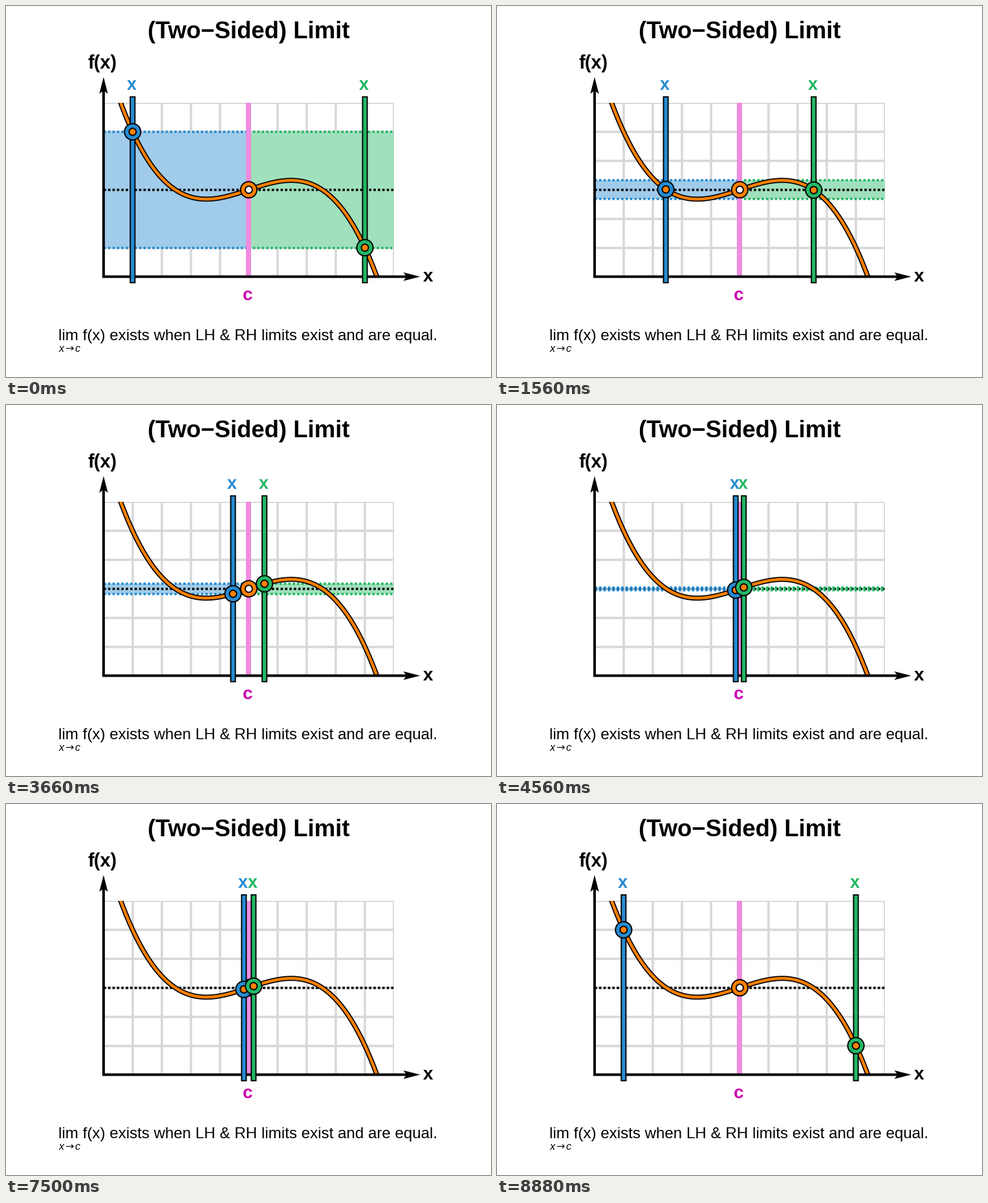
These frames come from a looping animation (750 by 575 pixels, 8940 ms). A matplotlib script:

```python
import numpy as np
import matplotlib.pyplot as plt
from matplotlib.animation import FuncAnimation
from matplotlib.patches import Circle, Polygon, Rectangle

WIDTH, HEIGHT, DPI = 750, 575, 100
FRAMES, INTERVAL = 149, 60
HOLD_END, MEET, LEAVE = 8, 93, 124

CX, CY, UNIT = 375.4, 284.8, 44.9
LEFT, RIGHT = CX - 5 * UNIT, CX + 5 * UNIT
TOP, BOTTOM = CY - 3 * UNIT, CY + 3 * UNIT
FAR = 4

BLUE, GREEN, ORANGE, TEAL = "#268bd2", "#22b765", "#ff8000", "#24a19c"
LIGHT_BLUE, LIGHT_GREEN = "#a0cbea", "#a0e0bd"
PINK, MAGENTA, GRID = "#ee8cdf", "#cc00b0", "#d8d8d8"
PT = 72 / DPI

fig = plt.figure(figsize=(WIDTH / DPI, HEIGHT / DPI), dpi=DPI, facecolor="white")
ax = fig.add_axes([0, 0, 1, 1])
ax.set(xlim=(0, WIDTH), ylim=(HEIGHT, 0))
ax.axis("off")


def curve(u):
    return u / 3 - 5 * u**3 / 96


def line(x, y, color, width, z, **style):
    style.setdefault("solid_capstyle", "butt")
    return ax.plot(x, y, color=color, lw=width * PT, zorder=z, **style)[0]


def dotted(x0, x1, color, z=3):
    return line([x0, x1], [CY, CY], color, 3.6, z,
                linestyle=(0, (1, 0.9)), dash_capstyle="butt")


def label(x, y, text, size, color="black", **style):
    style = {"weight": "bold", "family": "Liberation Sans", **style}
    return ax.text(x, y, text, fontsize=size * PT, color=color, va="baseline",
                   zorder=12, **style)


def x_to_c(x, y, size, color="black", weight="bold"):
    letters = dict(color=color, weight=weight, style="italic")
    return [label(x, y, "x", size, **letters),
            label(x + 0.57 * size, y, "→", size, color, weight="normal",
                  family="DejaVu Sans"),
            label(x + 1.5 * size, y, "c", size, **letters)]


def ring(color, center, z):
    outer = Circle((CX, CY), 12.6, fc=color, ec="black", lw=1.9 * PT, zorder=z)
    inner = Circle((CX, CY), 5.5, fc=center, ec="black", lw=1.9 * PT, zorder=z + 0.1)
    return [ax.add_patch(outer), ax.add_patch(inner)]


class Side:
    """One marker approaching c, with its band of values."""

    def __init__(self, sign, color, light, z):
        self.sign = sign
        x0, x1 = sorted((CX, CX + sign * 5 * UNIT))
        self.band = ax.add_patch(Rectangle((x0, CY), x1 - x0, 0, fc=light, lw=0, zorder=2))
        self.edges = [dotted(x0, x1, color) for _ in range(2)]
        self.bar = ax.add_patch(Rectangle((0, 140.8), 7.2, 288, fc=color, ec="black",
                                          lw=1.9 * PT, zorder=z, snap=False))
        self.ring = ring(color, ORANGE, z + 1)
        self.name = label(0, 129.5, "x", 27, color, ha="center")
        self.final = dotted(x0, x1, color)
        text_x = 40 if sign < 0 else 621
        self.limit = [label(text_x, 285, "lim f(x)", 29, color),
                      *x_to_c(text_x + 1, 306, 20, color)]

    def update(self, dist, reach, moving, banded):
        u = self.sign * dist
        x, y = CX + u * UNIT, CY - curve(u) * UNIT
        self.band.set_y(CY - reach)
        self.band.set_height(2 * reach)
        for edge, offset in zip(self.edges, (-reach, reach)):
            edge.set_ydata([CY + offset] * 2)
        self.bar.set_x(x - 3.6)
        for circle in self.ring:
            circle.center = x, y
        self.name.set_x(x - 1.6)
        show(moving, self.bar, self.name, *self.ring)
        show(banded, self.band, *self.edges)
        show(not moving, self.final, *self.limit)


def show(visible, *artists):
    for artist in artists:
        artist.set_visible(visible)


def draw_plot():
    frame = Rectangle((LEFT, TOP), RIGHT - LEFT, BOTTOM - TOP, transform=ax.transData)
    grid = [([LEFT + i * UNIT] * 2, [TOP, BOTTOM]) for i in range(11)]
    grid += [([LEFT, RIGHT], [TOP + i * UNIT] * 2) for i in range(7)]
    for x, y in grid:
        line(x, y, GRID, 3.6, 1).set_clip_path(frame)
    line([CX, CX], [TOP, BOTTOM], PINK, 8, 4)

    u = np.linspace(-4.6, 4.6, 400)
    for color, width, z in (("black", 7.8, 5), (ORANGE, 4.4, 5.1)):
        line(CX + u * UNIT, CY - curve(u) * UNIT, color, width, z).set_clip_path(frame)

    line([LEFT, LEFT, 620], [130, BOTTOM, BOTTOM], "black", 4, 6,
         solid_joinstyle="miter", snap=False)
    head = np.array([(0, 0), (-26, -6.6), (-21, 0), (-26, 6.6)])
    for points in (head + (640.5, BOTTOM), head[:, ::-1] * (1, -1) + (LEFT, 110)):
        ax.add_patch(Polygon(points, fc="black", lw=0, zorder=6))


def draw_text():
    label(375.4, 50, "(Two−Sided) Limit", 36.5, ha="center")
    label(126.5, 97, "f(x)", 29)
    label(644.5, 427, "x", 28)
    label(373.6, 456, "c", 28, MAGENTA, ha="center")
    label(81.3, 518, "lim f(x) exists when LH & RH limits exist and are equal.",
          24.15, weight="normal")
    x_to_c(82, 536, 16, weight="normal")


draw_plot()
draw_text()
middle = dotted(LEFT, RIGHT, "black")
hole = ring(ORANGE, "white", 7)[1]
met_name = label(373.8, 129.5, "x", 27, MAGENTA, ha="center")
sides = [Side(-1, BLUE, LIGHT_BLUE, 8), Side(1, GREEN, LIGHT_GREEN, 10)]


def distance(n):
    if n > LEAVE:
        return FAR * (n - LEAVE) / (FRAMES - 1 - LEAVE)
    t = np.clip((n - HOLD_END) / (MEET - HOLD_END), 0, 1)
    return FAR * (1 - t**1.08) ** 2.18


def update(n):
    dist = distance(n)
    moving = n < MEET or n > LEAVE
    reach = UNIT * np.abs(curve(np.linspace(0, dist, 200))).max()
    for side in sides:
        side.update(dist, reach, moving, n < MEET)
    show(moving, middle)
    show(not moving, met_name)
    hole.set_facecolor("white" if moving else TEAL)
    return []


animation = FuncAnimation(fig, update, frames=FRAMES, interval=INTERVAL,
                          repeat=True, repeat_delay=0)
plt.show()
```
